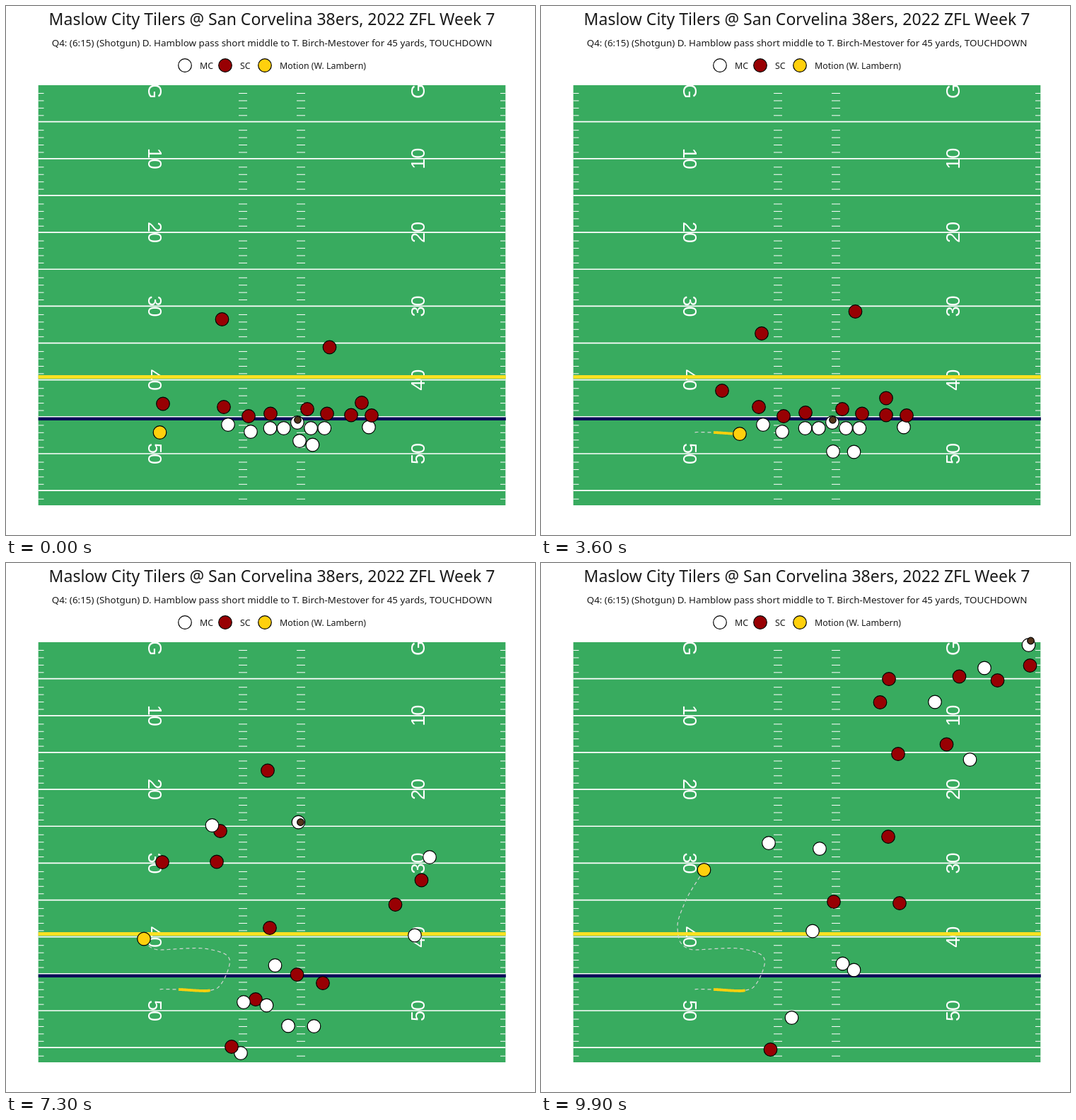
Animation, 748 px wide and 748 px high, one loop 10 s. Source, as an HTML page with a canvas:

```html
<!DOCTYPE html>
<html lang="en">
<head>
<meta charset="utf-8">
<title>Play animation</title>
<style>
html, body { margin: 0; width: 100%; height: 100%; overflow: hidden; background: #fff; }
canvas { display: block; }
</style>
</head>
<body>
<canvas id="stage" width="748" height="748"></canvas>
<script>
const ctx = document.getElementById('stage').getContext('2d');
const LOOP = 10000, STEP = 100;
const WHITE = '#fff', RED = '#980003', GOLD = '#ffd00d', BROWN = '#54351c';
const SANS = '"Noto Sans", "Open Sans", sans-serif';
const LEFT = 45.7, RIGHT = 706.3, TOP = 112, BOTTOM = 706;
const GOAL = 111.5, YARD = 10.43;
const SET = 3600, SNAP = 3700, THROW = 5700, CATCH = 6400;
const BEATS = [SET, 5100, 7300, 8700, 9900];
const JOG = [SET, 5100, 7300, 9900];

// Monotone cubic curve through keys [t, v]
function curve(keys) {
  const n = keys.length;
  const h = i => keys[i + 1][0] - keys[i][0];
  const slope = i => (keys[i + 1][1] - keys[i][1]) / h(i);
  const tangent = keys.map((k, i) => {
    if (i === 0) return slope(0);
    if (i === n - 1) return slope(n - 2);
    const a = slope(i - 1), b = slope(i);
    if (a * b <= 0) return 0;
    const wa = 2 * h(i) + h(i - 1), wb = h(i) + 2 * h(i - 1);
    return (wa + wb) / (wa / a + wb / b);
  });
  return t => {
    let i = 0;
    while (i < n - 2 && t >= keys[i + 1][0]) i++;
    const d = h(i), u = Math.min(1, Math.max(0, (t - keys[i][0]) / d)), v = 1 - u;
    return keys[i][1] * (1 + 2 * u) * v * v + tangent[i] * d * u * v * v +
      keys[i + 1][1] * u * u * (3 - 2 * u) - tangent[i + 1] * d * u * u * v;
  };
}

function route(keys) {
  const x = curve(keys.map(k => [k[0], k[1]]));
  const y = curve(keys.map(k => [k[0], k[2]]));
  return t => [x(t), y(t)];
}

// One point per beat; stands still before the snap unless other keys say so
function run(beats, points, extra = [[0, ...points[0]]]) {
  const keys = points.map((p, i) => [beats[i], ...p]).concat(extra);
  return route(keys.sort((a, b) => a[0] - b[0]));
}

// Defence
const corner = run(BEATS, [[256, 544], [252, 487], [221, 423], [347.5, 298.5], [479.5, 197]],
  [[0, 222, 562.5], [2500, 226, 567]]);
const safety = run(JOG, [[312, 463], [316.5, 502.5], [303, 379], [591.5, 160.5]],
  [[0, 305.5, 443], [2500, 302, 442]]);
const deep = run(BEATS, [[444.5, 432], [399.5, 382.5], [370, 293.5], [527, 212], [691.5, 145]],
  [[0, 457.5, 482.5], [2500, 452, 445]]);
const slot = run(BEATS, [[488, 554.5], [450, 545], [550.5, 483], [508, 361.5], [573.5, 256.5]],
  [[0, 503, 561], [2500, 495.5, 561]]);
const tackleL = run(BEATS, [[374, 575], [393, 616.5], [373, 516], [436, 370.5], [505, 270]],
  [[0, 374, 576.5], [2500, 367, 574]]);
const endL = run(BEATS, [[343, 580], [360, 629], [353, 617], [370, 541], [414, 479]]);
const backer = run(BEATS, [[426, 570], [389.5, 532], [298, 422.5], [396.5, 273], [492, 164]]);
const tackleR = run(BEATS, [[454, 576.5], [445, 645], [411.5, 582], [442.5, 470], [491, 387]]);
const endR = run(BEATS, [[488, 578.5], [451, 662], [448, 594], [483.5, 516], [507, 481]]);
const cover = run(BEATS, [[517, 579], [484, 520], [587.5, 448.5], [595, 303.5], [645.5, 166]]);
const nickel = run(JOG, [[308, 567], [343.5, 660], [319, 684], [324.5, 688]]);

// Offence
const wide = run(BEATS, [[314, 592], [310, 504], [291.5, 371], [453.5, 286], [557, 196.5]]);
const catcher = run(BEATS, [[341, 602], [350.5, 521], [413.5, 366.5], [550.5, 232.5], [689.5, 116]],
  [[0, 346, 602], [1100, 341, 602]]);
const tight = run(BEATS, [[513, 595.5], [481, 520.5], [599, 416], [622.5, 245], [627, 148.5]]);
const runner = run(BEATS, [[442.5, 630.5], [430.5, 601], [578, 526.5], [577, 393], [606.5, 278]],
  [[0, 433.5, 620.5], [1100, 443, 630.5]]);
const passer = run(JOG, [[413, 630], [405, 672], [332, 693], [354.5, 643]],
  [[0, 415, 615], [1100, 412.5, 631], [6300, 375, 697]]);

// Five linemen start in an even row, block, then jog upfield
const linemen = [
  [[356.5, 653], [336, 621], [322, 396]],
  [[373, 633], [368.5, 625.5], [384, 520.5]],
  [[404.5, 629], [380.5, 569], [394, 404]],
  [[439, 640.5], [399, 654.5], [426.5, 566.5]],
  [[443, 658.5], [435.5, 655], [442.5, 575.5]]
].map((points, i) => run(JOG, [[373.5 + 19.2 * i, i === 2 ? 589 : 597], ...points]));

const mover = route([
  [0, 217.5, 603], [2200, 221.5, 602.5], [2900, 244, 603], [SET, 281, 605], [4000, 297, 602],
  [4850, 316.5, 563], [5100, 312, 554.5], [5700, 270, 544.5], [6300, 218, 547],
  [7300, 195, 531.5], [7900, 193, 513], [8700, 203, 481], [9900, 230.5, 434]
]);

const mix = (a, b, u) => [a[0] + (b[0] - a[0]) * u, a[1] + (b[1] - a[1]) * u];
const held = t => {
  const [x, y] = passer(t);
  return [x + 11 * Math.min(1, (t - SNAP) / 1400), y - 3];
};
const carried = t => {
  const [x, y] = catcher(t), late = Math.max(0, (t - 8700) / 1200);
  return [x + 3, y - 6 * late];
};

function ball(t) {
  const spot = [412.5, 585.3];
  if (t < SNAP) return spot;
  if (t < THROW) return mix(spot, held(t), Math.min(1, (t - SNAP) / 400));
  if (t < CATCH) return mix(held(THROW), carried(CATCH), (t - THROW) / (CATCH - THROW));
  return carried(t);
}

function line(x1, y1, x2, y2, color, width) {
  ctx.strokeStyle = color;
  ctx.lineWidth = width;
  ctx.beginPath();
  ctx.moveTo(x1, y1);
  ctx.lineTo(x2, y2);
  ctx.stroke();
}

function dot([x, y], color, r = 9.3) {
  ctx.beginPath();
  ctx.arc(x, y, r, 0, Math.PI * 2);
  ctx.fillStyle = color;
  ctx.fill();
  ctx.strokeStyle = '#000';
  ctx.lineWidth = 1.2;
  ctx.stroke();
}

function text(str, x, y, size, align) {
  ctx.font = size + 'px ' + SANS;
  ctx.textAlign = align;
  ctx.textBaseline = 'alphabetic';
  ctx.fillStyle = '#1a1a1a';
  ctx.fillText(str, x, y);
}

function yardNumber(str, x, y, turn) {
  ctx.save();
  ctx.translate(x, y);
  ctx.rotate(turn * Math.PI / 2);
  ctx.font = '27px "Liberation Sans", Arial, sans-serif';
  ctx.textAlign = 'center';
  ctx.textBaseline = 'alphabetic';
  ctx.fillStyle = WHITE;
  ctx.fillText(str, 0, 9.3);
  ctx.restore();
}

function header() {
  text('Maslow City Tilers @ San Corvelina 38ers, 2022 ZFL Week 7', 376, 26.7, 23, 'center');
  text('Q4: (6:15) (Shotgun) D. Hamblow pass short middle to T. Birch-Mestover for 45 yards, TOUCHDOWN',
    376, 56.8, 13.4, 'center');
  [[253, WHITE, 'MC'], [310, RED, 'SC'], [366, GOLD, 'Motion (W. Lambern)']].forEach(([x, color, label]) => {
    dot([x, 84], color);
    text(label, x + 21, 88.6, 12.4, 'left');
  });
}

function field() {
  ctx.fillStyle = '#38ab5f';
  ctx.fillRect(LEFT, TOP, RIGHT - LEFT, BOTTOM - TOP);
  for (let yd = 1; yd <= 56; yd++) {
    const y = GOAL + yd * YARD;
    if (yd % 5 === 0) {
      line(LEFT, y, RIGHT, y, WHITE, 1.7);
    } else {
      [[LEFT, 53.5], [329, 341], [411, 423], [699, RIGHT]].forEach(([a, b]) => line(a, y + 1.6, b, y + 1.6, WHITE, 1));
    }
  }
  for (let yd = 0; yd <= 50; yd += 10) {
    const y = yd ? GOAL + yd * YARD : 120.5;
    yardNumber(yd || 'G', 210, y, 1);
    yardNumber(yd || 'G', 582.5, y, -1);
  }
  line(LEFT, 524.6, RIGHT + 0.5, 524.6, '#fbe122', 5);
  line(LEFT, 583.7, RIGHT + 0.5, 583.7, '#0b0b58', 4.6);
}

function trace(from, to) {
  ctx.beginPath();
  ctx.moveTo(...mover(from));
  for (let t = from + 25; t <= to; t += 25) ctx.lineTo(...mover(t));
  ctx.stroke();
}

function trail(t) {
  ctx.strokeStyle = '#d3d3d3';
  ctx.lineWidth = 1.2;
  ctx.setLineDash([5, 4]);
  trace(0, t);
  ctx.setLineDash([]);
  if (t > 2900) {
    ctx.strokeStyle = GOLD;
    ctx.lineWidth = 3.8;
    trace(2900, Math.min(t, 3775));
  }
}

const layers = [
  [RED, [corner, safety, deep, endL, tackleL, backer, tackleR, slot, endR]],
  [WHITE, [wide, catcher, ...linemen, tight, passer, runner]],
  [RED, [nickel, cover]],
  [GOLD, [mover]]
];

function draw(t) {
  ctx.fillStyle = WHITE;
  ctx.fillRect(0, 0, 748, 748);
  header();
  field();
  trail(t);
  layers.forEach(([color, group]) => group.forEach(p => dot(p(t), color)));
  dot(ball(t), BROWN, 4.8);
}

const start = performance.now();
function tick() {
  const t = (performance.now() - start) % LOOP;
  draw(Math.floor(t / STEP) * STEP);
  requestAnimationFrame(tick);
}
tick();
</script>
</body>
</html>
```
